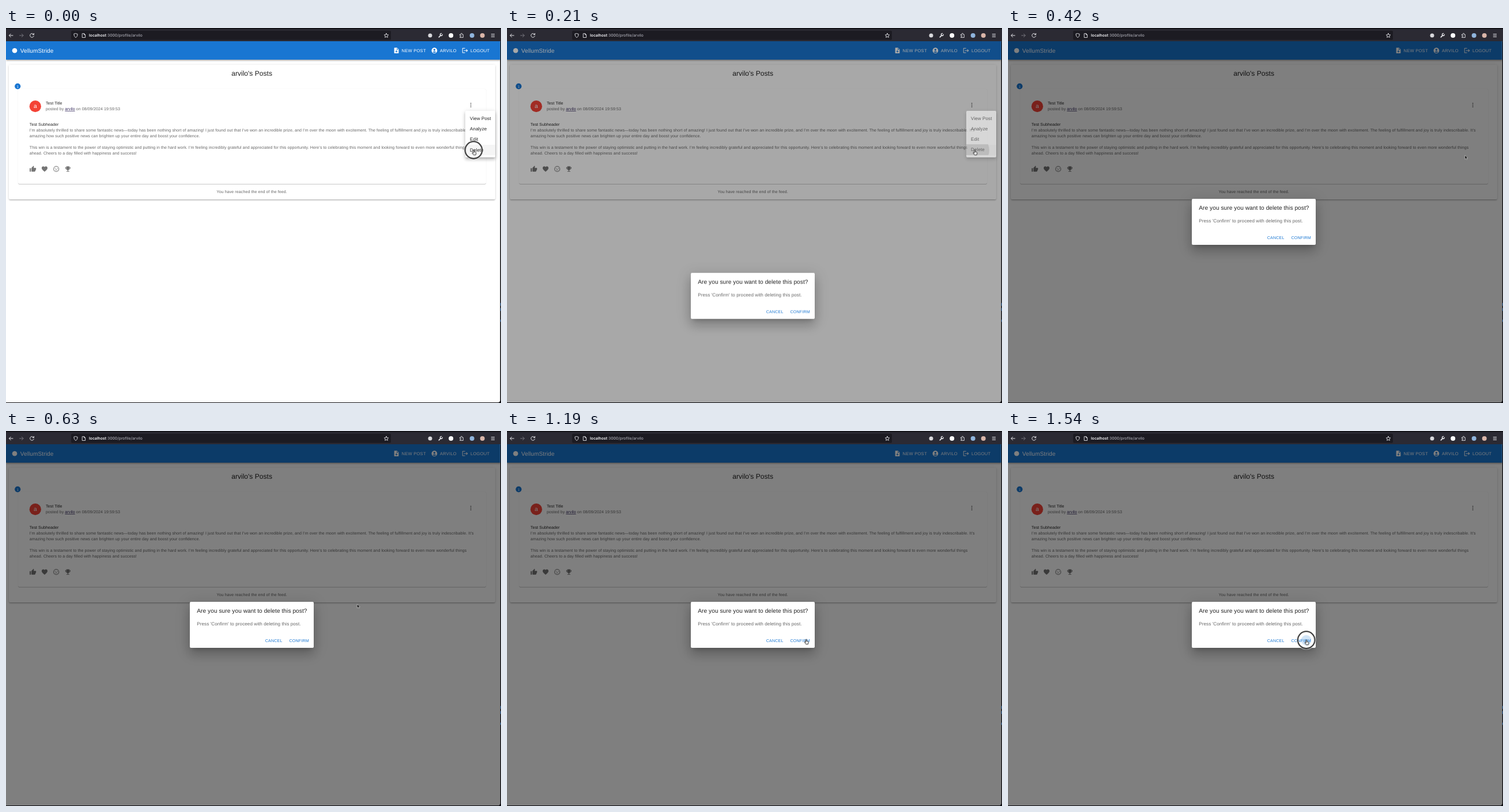
These frames come from a looping animation (859 px wide and 652 px high, 1610 ms). An HTML page:

```html
<!DOCTYPE html>
<html lang="en">
<head>
<meta charset="utf-8">
<title>Delete a post</title>
<style>
  html, body { margin: 0; width: 100%; height: 100%; overflow: hidden; background: #0b0b0f; }
  body { --t: 0ms; font-family: "Liberation Sans", Arial, sans-serif; text-rendering: geometricPrecision; }
  div, svg { position: absolute; }
  svg { left: 0; top: 0; overflow: visible; }
  .stage { left: 0; top: 0; width: 859px; height: 652px; overflow: hidden; }
  .page { inset: 0; background: #fff; clip-path: inset(23px 1.5px 1px 0 round 0 0 4px 0); }

  /* surfaces */
  .paper { background: #fff; border-radius: 2px; }
  .feed { left: 4.5px; top: 64px; width: 844.5px; height: 233.5px;
    box-shadow: 0 1.5px 1.5px -1px #0003, 0 1.5px 2px #00000024, 0 .5px 4px #0000001f; }
  .card { left: 20.8px; top: 106px; width: 812px; height: 165.3px;
    box-shadow: 0 1px .5px -.5px #0003, 0 .5px .5px #00000024, 0 .5px 1.5px #0000001f; }
  .bar { left: 0; top: 23px; width: 858px; height: 32.4px; background: #1976d2;
    box-shadow: 0 1px 2px -.5px #0003, 0 2px 2.5px #00000024, 0 .5px 5px #0000001f; }
  .menu { left: 796.6px; top: 144px; width: 52.2px; height: 81px; transform-origin: 0 0;
    box-shadow: 0 2.5px 2.5px -1.5px #0003, 0 4px 5px .5px #00000024, 0 1.5px 7px 1px #0000001f; }
  .hover { left: 0; top: 58.7px; width: 100%; height: 18.2px; background: #0000000a; overflow: hidden; }
  .dialog { left: 319px; top: 296.7px; width: 215.3px; height: 80.5px; opacity: 0;
    box-shadow: 0 5.5px 7.5px -3.5px #0003, 0 12px 19px 1.5px #00000024, 0 4.5px 23px 4px #0000001f; }
  .shade { inset: 0; background: #000; opacity: 0; }

  /* type */
  .h5 { font-size: 12.1px; }
  .h6 { font-size: 10.1px; letter-spacing: .076px; }
  .b1 { font-size: 8.08px; letter-spacing: .076px; }
  .b2 { font-size: 7.07px; letter-spacing: .076px; }
  .nav { font-size: 7.58px; letter-spacing: .216px; }
  .act { font-size: 7.07px; letter-spacing: .2px; fill: #1976d2; }
  .url { font: 500 6.75px Inter, "Open Sans", sans-serif; fill: #a9a9b2; }
  .dark { fill: #212121; }
  .soft { fill: #666; }
  .icon { fill: #757575; }
  .white { fill: #fff; }
  .mid { text-anchor: middle; }
  .line { fill: none; stroke: #e6e6ea; stroke-width: 1; stroke-linecap: round; stroke-linejoin: round; }

  /* motion: every animation is paused and placed in time by --t */
  .shade, .menu, .dialog, .ripple, .cursor, .arrow, .hand, .ring {
    animation-play-state: paused !important; }
  .shade { animation: dim 210ms linear calc(140ms - var(--t)) both; }
  .menu { animation: close 210ms linear calc(140ms - var(--t)) both; }
  .dialog { animation:
      show 1470ms linear calc(140ms - var(--t)),
      slide 191ms cubic-bezier(0, 0, .2, 1) calc(154ms - var(--t)) both; }
  .ripple { transform: scale(0); }
  .press { animation: press 280ms linear calc(0ms - var(--t)) both; }
  .confirm { animation: confirm 210ms linear calc(1400ms - var(--t)) both; }
  .cursor { animation: travel 980ms linear calc(280ms - var(--t)) both; }
  .arrow { opacity: 0; animation: show 700ms linear calc(420ms - var(--t)); }
  .hand { animation: hide 700ms linear calc(420ms - var(--t)); }
  .ring { opacity: 0; animation:
      hide-slow 140ms linear calc(0ms - var(--t)),
      ring-in 210ms linear calc(1400ms - var(--t)); }

  @keyframes show { from, to { opacity: 1; } }
  @keyframes hide { from, to { opacity: 0; } }
  @keyframes hide-slow { from { opacity: 1; } to { opacity: 0; } }
  @keyframes ring-in { from { opacity: .5; } 33%, to { opacity: 1; } }
  @keyframes dim { from { opacity: 0; } 33.3% { opacity: .34; } 66.7% { opacity: .485; } to { opacity: .5; } }
  @keyframes slide { from { transform: translateY(354px); } to { transform: none; } }
  @keyframes close {
    from { opacity: 1; }
    33.3% { opacity: .54; transform: none; }
    66.7% { opacity: .15; transform: scale(.827, .7); }
    to { opacity: 0; transform: scale(.75, .5625); }
  }
  @keyframes press {
    from { transform: scale(0); }
    50% { transform: scale(11); }
    75% { transform: scale(25); }
    to { transform: scale(31); }
  }
  @keyframes confirm { from, 33.3% { transform: scale(0); } 66.7%, to { transform: scale(9); } }
  @keyframes travel {
    from { transform: translate(811.5px, 212.3px); animation-timing-function: cubic-bezier(.6, 0, 1, .7); }
    28.57% { transform: translate(704.5px, 264.5px); }
    35.71% { transform: translate(609.5px, 301px); animation-timing-function: cubic-bezier(.1, .7, .4, 1); }
    85.71% { transform: translate(519.5px, 360.3px); }
    92.86% { transform: translate(518.8px, 362.2px); }
    to { transform: translate(517.6px, 363.3px); }
  }
</style>
</head>
<body>
<div class="stage">

  <!-- browser toolbar -->
  <svg width="859" height="652">
    <rect y="1.5" width="859" height="22" fill="#2b2a33"/>
    <rect x="113" y="4.8" width="555" height="16" rx="2" fill="#1c1b22"/>
    <g class="line">
      <path d="M12 13H5.5M8.2 10.2 5.4 13l2.8 2.8"/>
      <path d="M23.5 13H30M27.3 10.2 30.1 13l-2.8 2.8" stroke="#77767e"/>
      <path d="M48 11.2A3.4 3.4 0 1 0 48.3 14M48.4 9.4v2.2h-2.3"/>
      <path d="M121 9.6 124.2 10.6Q124.4 15 121 16.7 117.6 15 117.8 10.6Z" stroke-width=".9"/>
      <path d="M132.6 9.7h3l2 2v4.8h-5zM135.5 9.7v2.1h2" stroke-width=".9"/>
      <path d="M660 9.3l1.1 2.4 2.6.3-1.9 1.8.5 2.6-2.3-1.3-2.3 1.3.5-2.6-1.9-1.8 2.6-.3z" stroke-width=".9"/>
      <path d="M751.3 15.8l3.2-3.2" stroke-width="1.8"/>
      <path d="M757.3 11.2a2 2 0 1 1-1.7-1.7" stroke-width="1.3"/>
      <path d="M787.8 11.2h1.7v-1a1 1 0 0 1 2 0v1h1.8v5.3h-5.5v-1.6h.9a1 1 0 0 0 0-2h-.9z" stroke-width=".9"/>
      <path d="M842.2 10.6h5.4M842.2 13h5.4M842.2 15.4h5.4" stroke-width=".9"/>
    </g>
    <circle cx="736" cy="13" r="3.5" fill="#d8d8dc"/>
    <circle cx="772.2" cy="13" r="4" fill="#fff"/>
    <circle cx="808.7" cy="13" r="4" fill="#8fb4dc"/>
    <circle cx="826.7" cy="13" r="4" fill="#d9b5a8"/>
    <text class="url" x="144" y="15.4"><tspan fill="#fbfbfe" font-weight="600">localhost</tspan>:3000/profile/arvilo</text>
    <g fill="#1d4f86">
      <rect x="857.8" y="478" width="1.2" height="5"/>
      <rect x="857.8" y="487" width="1.2" height="5"/>
      <rect x="857.8" y="507" width="1.2" height="4"/>
    </g>
  </svg>

  <div class="page">
    <div class="paper feed"></div>
    <div class="paper card"></div>
    <div class="bar"></div>

    <svg width="859" height="652">
      <!-- app bar -->
      <g class="white">
        <circle cx="15" cy="39.2" r="4.3"/>
        <text class="h6" x="24.8" y="42.6">VellumStride</text>
        <path transform="translate(671.7 33.4) scale(.485)" d="M14 2H6c-1.1 0-1.99.9-1.99 2L4 20c0 1.1.89 2 1.99 2H18c1.1 0 2-.9 2-2V8l-6-6zm2 14h-3v3h-2v-3H8v-2h3v-3h2v3h3v2zm-3-7V3.5L18.5 9H13z"/>
        <text class="nav" x="686.6" y="41.6">NEW POST</text>
        <path transform="translate(737.6 33.4) scale(.485)" d="M12 2C6.48 2 2 6.48 2 12s4.48 10 10 10 10-4.48 10-10S17.52 2 12 2zm0 4c1.93 0 3.5 1.57 3.5 3.5S13.93 13 12 13s-3.5-1.57-3.5-3.5S10.07 6 12 6zm0 14c-2.03 0-4.43-.82-6.14-2.88C7.55 15.8 9.68 15 12 15s4.45.8 6.14 2.12C16.43 19.18 14.03 20 12 20z"/>
        <text class="nav" x="753" y="41.6">ARVILO</text>
        <path transform="translate(790.8 33.4) scale(.485)" d="M17 7l-1.41 1.41L18.17 11H8v2h10.17l-2.58 2.58L17 17l5-5zM4 5h8V3H4c-1.1 0-2 .9-2 2v14c0 1.1.9 2 2 2h8v-2H4V5z"/>
        <text class="nav" x="806" y="41.6">LOGOUT</text>
      </g>

      <!-- feed -->
      <text class="h5 dark mid" x="426.6" y="83.2">arvilo's Posts</text>
      <circle cx="20.2" cy="101.3" r="5.1" fill="#1976d2"/>
      <text class="white mid" x="20.2" y="103.5" font-size="6">1</text>
      <circle cx="50.8" cy="136.2" r="10.1" fill="#f44336"/>
      <text class="white mid" x="50.8" y="139.4" font-size="10.1">a</text>
      <g class="b2 soft">
        <text class="dark" x="69" y="133.2">Test Title</text>
        <text x="69" y="143.3">posted by <tspan fill="#2b1f55" text-decoration="underline">arvilo</tspan> on 08/09/2024 19:59:53</text>
        <text class="dark" x="40.8" y="169.6">Test Subheader</text>
        <text x="40.8" y="179.7">I’m absolutely thrilled to share some fantastic news—today has been nothing short of amazing! I just found out that I’ve won an incredible prize, and I’m over the moon with excitement. The feeling of fulfillment and joy is truly indescribable. It’s</text>
        <text x="40.8" y="189.8">amazing how such positive news can brighten up your entire day and boost your confidence.</text>
        <text x="40.8" y="210">This win is a testament to the power of staying optimistic and putting in the hard work. I’m feeling incredibly grateful and appreciated for this opportunity. Here’s to celebrating this moment and looking forward to even more wonderful things</text>
        <text x="40.8" y="220.1">ahead. Cheers to a day filled with happiness and success!</text>
        <text class="mid" x="426.7" y="286.7">You have reached the end of the feed.</text>
      </g>
      <g class="icon">
        <circle cx="806.6" cy="131.1" r="1"/><circle cx="806.6" cy="134.1" r="1"/><circle cx="806.6" cy="137.1" r="1"/>
        <path transform="translate(40.6 239.1) scale(.505)" d="M1 21h4V9H1v12zm22-11c0-1.1-.9-2-2-2h-6.31l.95-4.57.03-.32c0-.41-.17-.79-.44-1.06L14.17 1 7.59 7.59C7.22 7.95 7 8.45 7 9v10c0 1.1.9 2 2 2h9c.83 0 1.54-.5 1.84-1.22l3.02-7.05c.09-.23.14-.47.14-.73v-2z"/>
        <path transform="translate(60.9 239.1) scale(.505)" d="M12 21.35l-1.45-1.32C5.4 15.36 2 12.28 2 8.5 2 5.42 4.42 3 7.5 3c1.74 0 3.41.81 4.5 2.09C13.09 3.81 14.76 3 16.5 3 19.58 3 22 5.42 22 8.5c0 3.78-3.4 6.86-8.55 11.54L12 21.35z"/>
        <g transform="translate(81.1 239.1) scale(.505)">
          <circle cx="12" cy="12" r="9" fill="none" stroke="#757575" stroke-width="2"/>
          <circle cx="8.5" cy="9.5" r="1.5"/><circle cx="15.5" cy="9.5" r="1.5"/>
          <path d="M7.6 17Q12 11.5 16.4 17" fill="none" stroke="#757575" stroke-width="1.6"/>
        </g>
        <path transform="translate(101.3 239.1) scale(.505)" d="M19 5h-2V3H7v2H5c-1.1 0-2 .9-2 2v1c0 2.55 1.92 4.63 4.39 4.94.63 1.5 1.98 2.63 3.61 2.96V19H7v2h10v-2h-4v-3.1c1.63-.33 2.98-1.46 3.61-2.96C19.08 12.63 21 10.55 21 8V7c0-1.1-.9-2-2-2zM5 8V7h2v3.82C5.84 10.4 5 9.3 5 8zm14 0c0 1.3-.84 2.4-2 2.82V7h2v1z"/>
      </g>
    </svg>

    <div class="shade"></div>

    <div class="paper menu">
      <div class="hover">
        <svg width="53" height="19"><g transform="translate(15 9.5)"><circle class="ripple press" r="1" fill="#00000029"/></g></svg>
      </div>
      <svg class="b1 dark" width="53" height="81">
        <text x="8.1" y="15.9">View Post</text>
        <text x="8.1" y="34.1">Analyze</text>
        <text x="8.1" y="52.3">Edit</text>
        <text x="8.1" y="70.5">Delete</text>
      </svg>
    </div>

    <div class="paper dialog">
      <svg width="216" height="81">
        <text class="h6 dark" x="12.3" y="18.9">Are you sure you want to delete this post?</text>
        <text class="b1 soft" x="12.3" y="40.6">Press 'Confirm' to proceed with deleting this post.</text>
        <g transform="translate(198.6 66.8)"><circle class="ripple confirm" r="1" fill="#1976d233"/></g>
        <text class="act" x="130.7" y="69.8">CANCEL</text>
        <text class="act" x="172.5" y="69.8">CONFIRM</text>
      </svg>
    </div>
  </div>

  <!-- pointer -->
  <svg width="859" height="652">
    <g class="cursor">
      <g class="ring" fill="none">
        <circle r="15" stroke="#fff" stroke-opacity=".8" stroke-width="3.2"/>
        <circle r="14.8" stroke="#0a0a0a" stroke-width="1.8"/>
      </g>
      <path class="arrow" d="M0 0V6.6L1.5 5.2 2.5 7.5 3.6 7 2.6 4.8H4.6Z" fill="#000" stroke="#fff" stroke-width=".5"/>
      <path class="hand" transform="translate(.8 4.2)" d="M-1.2 1V-3.4a.8.8 0 0 1 1.6 0V-1L2.6-.6Q3.6-.3 3.5.8L2.8 4.2H-.9L-3.2.9Q-3.4-.2-2.4 0Z" fill="#fff" stroke="#111" stroke-width=".9" stroke-linejoin="round"/>
    </g>
  </svg>
</div>

<script>
  const LOOP = 1610, TICK = 70;
  const start = performance.now();

  function draw() {
    const t = (performance.now() - start) % LOOP;
    document.body.style.setProperty("--t", Math.floor(t / TICK) * TICK + "ms");
    requestAnimationFrame(draw);
  }
  draw();
</script>
</body>
</html>
```
